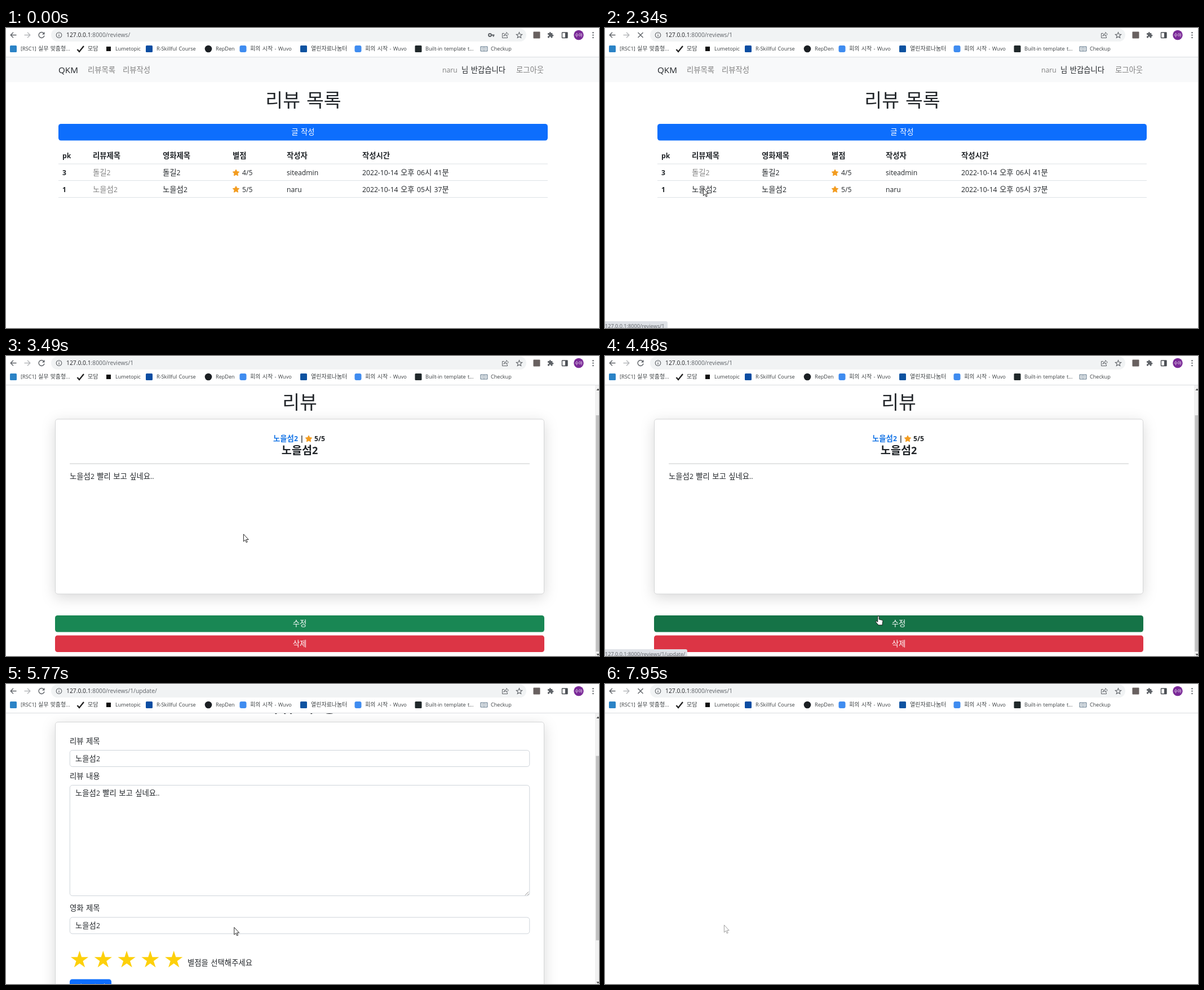
Animation, 1052 px wide and 532 px high, one loop 8000 ms. Source, as an HTML page:

```html
<!DOCTYPE html>
<html lang="ko">
<head>
<meta charset="utf-8">
<title>리뷰</title>
<style>
html, body { margin: 0; width: 100%; height: 100%; overflow: hidden; background: #fff; }
svg { display: block; width: 1052px; height: 532px; }
text { font-family: "Open Sans", "Noto Sans CJK KR", sans-serif; fill: #212529; white-space: pre; }
.ko { font-family: "Noto Sans CJK KR", sans-serif; }
.card { fill: #fff; stroke: #d3d4d5; filter: drop-shadow(0 6px 12px rgba(0,0,0,.15)); }
.field { fill: #fff; stroke: #ced4da; }
.icon { fill: none; stroke: #5f6368; stroke-width: 1.4; }
</style>
</head>
<body>
<svg id="stage" viewBox="0 0 1052 532"></svg>
<script>
const INK = '#212529', GRAY = '#808080', BLUE = '#0d6efd', GOLD = '#fdd00a';
const BODY = 12.2, SMALL = 9.15;
const USER = 'naru', FILM = '노을섬2', FILM_B = '돌길2';

// Hangul runs are set a little larger than the Latin ones beside them.
function runs(str, size) {
  const big = (size * 1.095).toFixed(2);
  return str.replace(/[가-힣]+/g, s => `<tspan class="ko" font-size="${big}">${s}</tspan>`);
}
function text(x, y, str, o = {}) {
  const size = o.size || BODY;
  return `<text x="${x}" y="${y}" font-size="${size}" style="fill:${o.fill || INK};word-spacing:.1em" ` +
    `font-weight="${o.weight || (o.bold ? 700 : 400)}" ` +
    `text-anchor="${o.mid ? 'middle' : 'start'}" ${o.id ? `id="${o.id}"` : ''}>${runs(str, size)}</text>`;
}
function rect(x, y, w, h, fill, r = 0, extra = '') {
  return `<rect x="${x}" y="${y}" width="${w}" height="${h}" rx="${r}" fill="${fill}" ${extra}/>`;
}
function box(cls, x, y, w, h) {
  return `<rect class="${cls}" x="${x}" y="${y}" width="${w}" height="${h}" rx="4.5"/>`;
}
function path(d, extra = 'class="icon"') { return `<path d="${d}" ${extra}/>`; }
function line(x1, x2, y, color) { return rect(x1, y, x2 - x1, 1, color); }
function star(cx, cy, r, inner, fill, extra = '') {
  const pts = Array.from({ length: 10 }, (_, i) => {
    const a = i * Math.PI / 5, q = i % 2 ? r * inner : r;
    return (cx + q * Math.sin(a)).toFixed(2) + ',' + (cy - q * Math.cos(a)).toFixed(2);
  });
  return `<polygon points="${pts.join(' ')}" fill="${fill}" ${extra}/>`;
}
function orangeStar(x, y) {
  return star(x, y, 6, .5, '#f39c1f', 'stroke="#f39c1f" stroke-width="1" stroke-linejoin="round"');
}
function button(x, y, w, fill, label, id) {
  return rect(x, y, w, 29.5, fill, 4.5, `id="${id}"`) +
    text(x + w / 2, y + 19.3, label, { fill: '#fff', mid: true });
}
function group(id, body) { return `<g id="${id}">${body}</g>`; }

function navbar(dx, w) {
  return rect(0, 52, w, 44, '#f8f9fa') +
    text(93 + dx, 80, 'QKM', { size: 15.2 }) +
    text(145 + dx, 78.5, '리뷰목록', { fill: GRAY }) +
    text(207 + dx, 78.5, '리뷰작성', { fill: GRAY }) +
    text(774 + dx, 78.5, USER, { fill: GRAY }) +
    text(808 + dx, 78.5, '님 반갑습니다') +
    text(905 + dx, 78.5, '로그아웃', { fill: GRAY });
}
function heading(x, str) { return text(x, 140, str, { size: 30.6, mid: true, weight: 350 }); }

function listPage() {
  const cols = [100, 154, 278, 402, 498, 632];
  const head = ['pk', '리뷰제목', '영화제목', '별점', '작성자', '작성시간'];
  const rows = [
    ['3', FILM_B, FILM_B, '4/5', 'siteadmin', '2022-10-14 오후 06시 41분'],
    ['1', FILM, FILM, '5/5', USER, '2022-10-14 오후 05시 37분']];
  let s = navbar(0, 1052) + heading(527.5, '리뷰 목록') + button(93, 170, 868, BLUE, '글 작성', 'write');
  head.forEach((h, i) => s += text(cols[i], 231.3, h, { bold: true }));
  s += line(93, 961, 240.5, '#dee2e6');
  rows.forEach((row, r) => {
    const y = 261 + r * 29.5;
    row.forEach((v, i) => s += text(cols[i] + (i === 3 ? 17 : 0), y, v,
      { bold: i === 0, fill: i === 1 ? GRAY : INK, id: i === 1 ? 'link' + r : '' }));
    s += orangeStar(408, y - 4) + line(93, 961, 270 + r * 30, '#dee2e6');
  });
  return s;
}
function detailPage() {
  return navbar(-6.5, 1046) + heading(521, '리뷰') + box('card', 87.5, 158, 867, 310) +
    text(474, 197, FILM, { bold: true, fill: '#1273e6' }) +
    text(521.5, 197, '|', { bold: true }) + orangeStar(537, 193) +
    text(547, 197, '5/5', { bold: true }) +
    text(521, 219.5, FILM, { bold: true, size: 18, mid: true }) +
    line(113, 929, 236.5, '#c8c9ca') +
    text(113, 263.5, FILM + ' 빨리 보고 싶네요..') +
    button(87, 506, 868, '#198754', '수정', 'edit') +
    button(87, 541.5, 868, '#dc3545', '삭제', 'del');
}
function updatePage() {
  let s = navbar(-6.5, 1046) + heading(521, '리뷰 수정') + box('card', 87.5, 158, 867, 536) +
    text(113, 196.5, '리뷰 제목') + box('field', 113.3, 208, 815.5, 29) + text(123, 227, FILM) +
    text(113, 258.5, '리뷰 내용') + box('field', 113.3, 270, 815.5, 196) +
    text(123, 288.5, FILM + ' 빨리 보고 싶네요..') +
    path('M921 465l6-6M925 465l2.5-2.5', 'stroke="#777" stroke-width=".9"') +
    text(113, 492.5, '영화 제목') + box('field', 113.3, 504.3, 815.5, 29) + text(123, 523, FILM);
  for (let i = 0; i < 5; i++) s += star(130.5 + i * 41.8, 579.8, 16.4, .382, GOLD, `id="rate${i}"`);
  return s + text(322, 589, '별점을 선택해주세요') + button(113, 614, 74, BLUE, '리뷰 수정', 'save');
}

function scrollbar() {
  return rect(1045, 52, 7, 480, '#f1f1f1') + rect(1046.5, 66, 5.5, 419, '#c1c1c1', 0, 'id="thumb"') +
    path('M1047.5 61l2.7-3.5 2.7 3.5zM1047.5 528l2.7 3.5 2.7-3.5z', 'fill="#505050"');
}
function bookmarks() {
  const square = (x, c, w = 12, r = 1.5) => rect(x - w / 2, 37 - w / 2, w, w, c, r);
  const names = [[26, '[RSC1] 실무 맞춤형...'], [145, '모담'], [194, 'Lumetopic'], [267, 'R-Skillful Course'],
    [372, 'RepDen'], [433, '회의 시작 - Wuvo'], [541, '열린자료나눔터'], [637, '회의 시작 - Wuvo'],
    [744, 'Built-in template t...'], [860, 'Checkup']];
  return square(13, '#2b83c6') + path('M126.5 38l3.5 4 8-10', 'fill="none" stroke="#222" stroke-width="2.4"') +
    square(182, '#111', 8, 0) + square(254, '#0b4da2') +
    '<circle cx="359" cy="37" r="6.3" fill="#1b1f23"/>' +
    square(420.5, '#3f8cf0', 12, 3) + square(528, '#0d52a0') + square(624.5, '#3f8cf0', 12, 3) +
    square(731.5, '#20282a') +
    path('M842 33h5.5l.5 1 .5-1h5.5v8h-12z', 'fill="#e8ecef" stroke="#5b7286" stroke-width="1"') +
    path('M848 34v7.5M844 35.5h2.5M844 38h2.5M849.7 35.5h2.5M849.7 38h2.5', 'stroke="#7d8e9c" stroke-width=".8"') +
    names.map(([x, s]) => text(x, 40.3, s, { size: SMALL, fill: '#3c4043' })).join('');
}
function toolbar() {
  const puzzle = 'M20.5 11H19V7c0-1.1-.9-2-2-2h-4V3.5a2.5 2.5 0 0 0-5 0V5H4c-1.1 0-2 .9-2 2v3.8h1.5a2.7 2.7 0 0 1 0 5.4H2V20c0 1.1.9 2 2 2h3.8v-1.5a2.7 2.7 0 0 1 5.4 0V22H17c1.1 0 2-.9 2-2v-4h1.5a2.5 2.5 0 0 0 0-5z';
  return rect(0, 0, 1052, 51, '#fff') + line(0, 1052, 51, '#dadce0') +
    path('M18.5 12.5H8.5M13 7.7L8.2 12.5l4.8 4.8') +
    path('M32.5 12.5h10M38 7.7l4.8 4.8-4.8 4.8', 'class="icon" style="stroke:#b5b7ba"') +
    group('reload', path('M67.2 9.6A5 5 0 1 0 68 13.5') + path('M68.5 6.8v4.6h-4.6z', 'fill="#5f6368"')) +
    group('stop', path('M58.5 8l9 9M67.5 8l-9 9')) +
    rect(80, 1, 843, 23, '#f1f3f4', 11.5) +
    '<circle class="icon" cx="94" cy="12.5" r="4.8" style="stroke-width:1.1"/>' +
    path('M94 12v3.2M94 9.6v1.2', 'class="icon" style="stroke-width:1.2"') +
    text(107, 16.2, '', { size: 10.3, fill: '#5f6368', id: 'url' }) +
    group('key', '<circle class="icon" cx="858.5" cy="12.5" r="2.4" style="stroke-width:2"/>' +
      path('M861 12.5h5.5M864.7 12.5v3', 'class="icon" style="stroke-width:2"')) +
    path('M884 9.5h-3.5v8h9v-2.5M882.8 14.5q.6-4.3 5-4.6V7.5l3.6 3.7-3.6 3.5v-2.4q-3-.2-5 2.2z', 'class="icon" style="stroke-width:1"') +
    star(910.5, 13, 5.4, .45, 'none', 'stroke="#5f6368" stroke-width="1.1"') +
    rect(935.5, 6.5, 12, 12, '#68605f', 1) +
    path(puzzle, 'fill="#5f6368" transform="translate(960 6.4) scale(.5)"') +
    rect(986.5, 8, 9.5, 9.5, 'none', .5, 'stroke="#4b4f54" stroke-width="1.4"') +
    rect(992, 8, 4, 9.5, '#4b4f54') +
    '<circle cx="1016" cy="12.5" r="8.7" fill="#7b2a98"/>' +
    text(1016, 15, '수아', { size: 6.6, fill: '#fff', mid: true }) +
    [8.2, 12.6, 17].map(y => `<circle cx="1041.5" cy="${y}" r="1.2" fill="#5f6368"/>`).join('') +
    bookmarks();
}
function pointer() {
  const look = 'fill="#fff" stroke="#111" stroke-width=".9" stroke-linejoin="round"';
  return group('arrow', path('M.4.4V13.4L3.3 10.7l2 4.5 1.9-.9-2-4.3h4z', look)) +
    group('hand', path('M-1.2 1.2a1.2 1.2 0 0 1 2.4 0V6l5.2 1.3q1.7.5 1.5 2.2l-.8 4.2v2.4H0L-4.6 10.6q-.8-1.4.6-1.7l2.8 1.6z', look));
}

document.getElementById('stage').innerHTML =
  rect(0, 0, 1052, 532, '#fff') + group('list', listPage()) + group('detail', detailPage()) +
  group('update', updatePage()) + group('bar', scrollbar()) + toolbar() +
  group('bubble', path('M0 520h143q3 0 3 3v9H0z', 'id="bubbleBox" fill="#dee1e6"') +
    text(0, 531.8, '', { size: SMALL, fill: '#5f6368', id: 'status' })) +
  group('cursor', pointer());

const $ = id => document.getElementById(id);
const show = (id, on) => $(id).style.display = on ? '' : 'none';
const fill = (id, c) => $(id).style.fill = c;
const move = (id, x, y) => $(id).setAttribute('transform', `translate(${x.toFixed(2)} ${y.toFixed(2)})`);
const within = (t, a, b) => t >= a && t < b;
const HOST = '<tspan style="fill:#202124">127.0.0.1</tspan>';

// time, x, y
const track = [[570, 923, 525], [800, 560, 410], [1000, 270, 297], [1190, 184.5, 266.5], [1320, 176, 279],
  [1590, 174, 284], [2340, 174, 284], [2410, 174, 282], [2850, 174, 282], [3350, 421, 315.5], [3880, 421, 315.5],
  [4400, 485, 461], [5100, 485, 461], [5510, 440, 440], [5950, 380, 425], [6320, 254, 403], [6390, 254, 403],
  [6550, 258, 388], [6720, 258, 388], [7130, 153, 430], [7480, 153, 430], [7850, 211, 427]];

function cursorAt(t) {
  const i = track.findIndex(p => p[0] > t);
  if (i < 0) return track[track.length - 1].slice(1);
  const [t0, x0, y0] = track[i - 1], [t1, x1, y1] = track[i], k = (t - t0) / (t1 - t0);
  return [x0 + (x1 - x0) * k, y0 + (y1 - y0) * k];
}
function scrollAt(t) {
  if (t < 5000) return t < 3420 ? 0 : t < 3490 ? 26 : 46;
  const k = Math.min(1, Math.max(0, (t - 5580) / 400));
  return 194 * k * k * (3 - 2 * k);
}

function render(t) {
  const detail = within(t, 2680, 4780), update = within(t, 5000, 7690), y = scrollAt(t);
  show('list', t < 2610);
  show('detail', detail);
  show('update', update);
  show('bar', detail || update);
  move('detail', 0, -y);
  move('update', 0, -y);
  $('thumb').setAttribute('y', 66 + y * (update ? .68 : .85));
  $('thumb').setAttribute('height', update ? 327 : 419);

  const editing = within(t, 4710, 7690);
  $('url').innerHTML = HOST + ':8000/reviews/' + (t < 2340 ? '' : editing ? '1/update/' : '1');
  show('key', t < 2340);
  const loading = within(t, 1950, 2680) || within(t, 4640, 5000) || t >= 7550;
  show('stop', loading);
  show('reload', !loading);

  const toDetail = within(t, 1740, 2610);
  show('bubble', toDetail || within(t, 4450, 5000));
  $('status').textContent = '127.0.0.1:8000/reviews/1' + (toDetail ? '' : '/update/');
  $('bubbleBox').setAttribute('d', `M0 520h${toDetail ? 108 : 143}q3 0 3 3v9H0z`);

  fill('link1', within(t, 1390, 2610) ? INK : GRAY);
  fill('edit', t >= 4380 ? '#157347' : '#198754');
  fill('save', t >= 7200 ? '#0b5ed7' : BLUE);
  fill('rate4', t >= 6650 ? '#f0f0f0' : GOLD);

  show('cursor', t >= 570);
  if (t < 570) return;
  const hand = within(t, 1390, 2340) || within(t, 4380, 4780) || within(t, 7100, 7690);
  show('hand', hand);
  show('arrow', !hand);
  move('cursor', ...cursorAt(t));
  $('cursor').style.opacity = t >= 7900 ? .45 : within(t, 4850, 5000) ? .7 : 1;
}

const start = performance.now();
function tick() {
  render((performance.now() - start) % 8000);
  requestAnimationFrame(tick);
}
tick();
</script>
</body>
</html>
```
